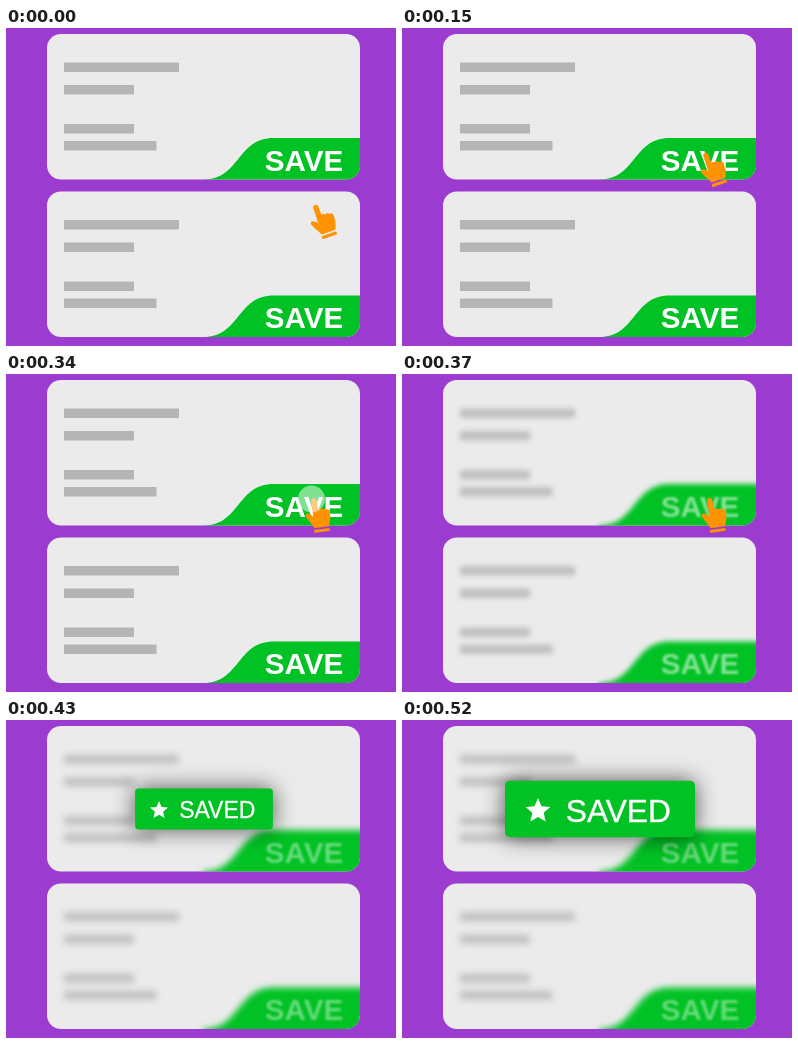
An HTML page with a canvas for the animation above (1780 ms loop, 390 by 318 pixels).

```html
<!DOCTYPE html>
<html lang="en">
<head>
<meta charset="utf-8">
<title>Save cards</title>
<style>
html, body { margin: 0; width: 100%; height: 100%; overflow: hidden; background: #9c3bd0; }
canvas { display: block; width: 390px; height: 318px; }
</style>
</head>
<body>
<canvas id="stage" width="390" height="318"></canvas>
<script>
const ctx = document.getElementById('stage').getContext('2d');
const LOOP = 1780, STEP = 30;
const GREEN = '#00c224', ORANGE = '#ff9200';
const FONT = '"Liberation Sans", Arial, sans-serif';
const BARS = [[34.5, 115], [57, 70], [96, 70], [113, 92.5]];

const HAND = new Path2D(
  'M-2.6 2.6 Q-2.6 0 0 0 Q2.6 0 2.6 2.6 L2.9 11.5 ' +
  'Q5 10.4 6.8 12.2 Q9 11.2 10.5 13 Q13.8 12.4 14.2 15.5 ' +
  'L14 22 Q13.6 25 11.2 30 L-3.2 30 Q-5 26 -7.5 22.5 L-10 17.5 ' +
  'Q-10.3 14.6 -7.6 14.6 Q-5.5 15 -2.8 18.5 Z');

const clamp = v => Math.max(0, Math.min(1, v));
const mix = (a, b, p) => a + (b - a) * p;
const span = (t, from, to) => clamp((t - from) / (to - from));

function box(x, y, w, h, r) {
  ctx.beginPath();
  ctx.roundRect(x, y, w, h, r);
}

function blur(px) {
  ctx.filter = px > 0 ? `blur(${px}px)` : 'none';
}

function card(y, fade) {
  ctx.save();
  ctx.translate(0, y);
  box(41, 6, 313, 145.5, 14);
  ctx.fillStyle = '#ebebeb';
  ctx.fill();
  ctx.clip();

  blur(3 * fade);
  ctx.globalAlpha = mix(1, 0.72, fade);
  ctx.fillStyle = '#b5b5b5';
  for (const [top, w] of BARS) ctx.fillRect(58, top, w, 9.5);

  ctx.globalAlpha = 1;
  ctx.fillStyle = GREEN;
  ctx.beginPath();
  ctx.moveTo(197, 151.5);
  ctx.bezierCurveTo(235, 151.5, 230, 110, 268, 110);
  ctx.lineTo(375, 110);
  ctx.lineTo(375, 172);
  ctx.lineTo(197, 172);
  ctx.fill();

  blur(1.1 * fade);
  ctx.globalAlpha = mix(1, 0.4, fade);
  ctx.fillStyle = '#fff';
  ctx.font = `bold 29.6px ${FONT}`;
  ctx.textAlign = 'center';
  ctx.fillText('SAVE', 298, 142.5);
  ctx.restore();
}

function hand(x, y, deg, alpha) {
  ctx.save();
  ctx.globalAlpha = alpha;
  ctx.translate(x, y);
  ctx.rotate(deg * Math.PI / 180);
  ctx.fillStyle = ORANGE;
  ctx.fill(HAND);
  ctx.fillRect(-4, 31.8, 15.5, 3);
  ctx.restore();
}

function ripple(x, y, p) {
  ctx.save();
  ctx.globalAlpha = mix(1, 0.5, p);
  ctx.fillStyle = '#fff';
  ctx.beginPath();
  ctx.arc(x, y, mix(6, 13.5, p), 0, 2 * Math.PI);
  ctx.fill();
  ctx.restore();
}

function star(x, y, r) {
  ctx.beginPath();
  for (let i = 0; i < 10; i++) {
    const a = i * Math.PI / 5, d = i % 2 ? r * 0.46 : r;
    ctx.lineTo(x + d * Math.sin(a), y - d * Math.cos(a));
  }
  ctx.fill();
}

function badge(scale) {
  ctx.save();
  ctx.translate(198, 89);
  ctx.scale(scale, scale);
  ctx.save();
  ctx.shadowColor = 'rgba(0,0,0,.65)';
  ctx.shadowBlur = 22;
  ctx.fillStyle = GREEN;
  box(-95, -28.2, 190, 56.4, 5);
  ctx.fill();
  ctx.restore();
  ctx.fillStyle = ctx.strokeStyle = '#fff';
  star(-62, 2, 13);
  ctx.font = `31.7px ${FONT}`;
  ctx.textAlign = 'center';
  ctx.lineWidth = 0.4;
  ctx.fillText('SAVED', 18.3, 12.8);
  ctx.strokeText('SAVED', 18.3, 12.8);
  ctx.restore();
}

// Stepped time: 30 ms ticks with a short rest before the tap.
function tick(ms) {
  if (ms < 250) return Math.min(150, Math.floor(ms / STEP) * STEP);
  return Math.min(520, 250 + Math.floor((ms - 250) / STEP) * STEP);
}

function draw(t) {
  ctx.fillStyle = '#9c3bd0';
  ctx.fillRect(0, 0, 390, 318);

  const fade = t < 370 ? 0 : mix(0.8, 1, span(t, 370, 430));
  card(0, fade);
  card(157.5, fade);

  const reach = span(t, 0, 150), tap = span(t, 250, 340);
  const x = mix(mix(309, 303, reach), 307.5, tap);
  const y = mix(mix(177, 125, reach), 124, tap);
  const shown = 1 - span(t, 370, 430);
  if (shown > 0) hand(x, y, mix(-19, -8, tap), shown);
  if (t >= 250 && t < 370) ripple(mix(303, 305.5, tap), mix(126, 125, tap), tap);

  const pop = 1 - Math.pow(1 - span(t, 370, 520), 2.53);
  if (pop > 0) badge(pop);
}

let start = null;
function frame(now) {
  if (start === null) start = now;
  draw(tick((now - start) % LOOP));
  requestAnimationFrame(frame);
}
draw(0);
requestAnimationFrame(frame);
</script>
</body>
</html>
```
